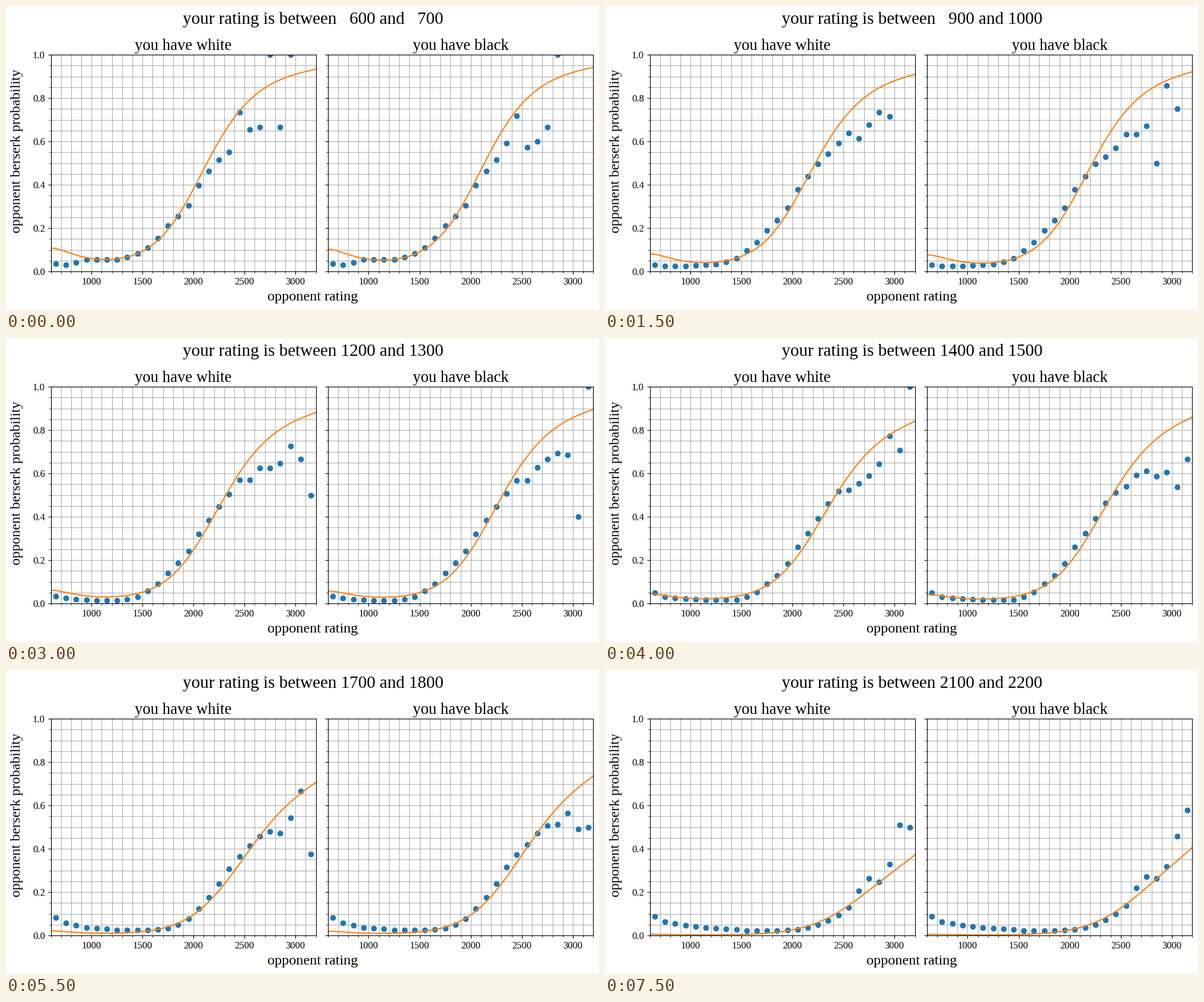
Animation of 1000 by 512 pixels, one loop 8 s. Source, as a matplotlib script:

```python
import numpy as np
import matplotlib.pyplot as plt
from matplotlib.animation import FuncAnimation
from matplotlib.ticker import MultipleLocator

W, H, DPI = 1000, 512, 100
STEPS = 16
NA = np.nan
plt.rcParams["font.family"] = "Liberation Serif"


def logit(p):
    return np.log(p / (1 - p))


def logistic(z):
    return 1 / (1 + np.exp(-z))


# Fitted curve: logit = shape(opponent rating) + shift(own rating)
shape_x = np.array([0.6, 0.85, 1.05, 1.15, 1.25, 1.35, 1.45, 1.55, 1.65, 1.85,
                    2.0, 2.15, 2.25, 2.45, 2.65, 2.85, 3.05, 3.2])
shape_y = [-2.11, -2.51, -2.81, -2.845, -2.8, -2.64, -2.41, -2.11, -1.78, -1.09,
           -0.48, 0.09, 0.39, 1.05, 1.58, 2.04, 2.39, 2.634]
shape = np.polynomial.Polynomial.fit(shape_x, shape_y, 7)

KEYS = [0, 3, 6, 8, 11, 13, 15]
shift = np.polynomial.Polynomial.fit(
    KEYS, [0, -0.322, -0.63, -0.97, -1.755, -2.43, -3.16], 5)

# Observed rates at the key steps: common low part, then a noisy tail per colour
body_x = [650, 750, 950, 1250, 1450, 1550, 1750, 1950, 2050, 2150, 2250]
BODY = np.array([
    [.036, .029, .055, .055, .081, .110, .211, .305, .398, .463, .515],
    [.031, .024, .024, .032, .060, .095, .189, .292, .377, .438, .495],
    [.034, .024, .016, .013, .031, .058, .139, .242, .320, .384, .446],
    [.048, .030, .021, .016, .016, .031, .090, .183, .260, .323, .392],
    [.082, .058, .036, .026, .024, .024, .032, .076, .122, .174, .237],
    [.076, .069, .041, .028, .024, .022, .024, .036, .056, .083, .120],
    [.088, .062, .047, .032, .027, .023, .021, .024, .027, .035, .049],
])
WHITE = np.array([
    [.550, .735, .655, .667, 1, .667, 1, NA, NA],
    [.543, .592, .637, .613, .677, .733, .714, NA, NA],
    [.505, .570, .570, .624, .624, .646, .725, .667, .5],
    [.460, .517, .522, .554, .588, .645, .772, .706, 1],
    [.306, .365, .415, .458, .480, .472, .543, .667, .375],
    [.168, .215, .272, .336, .394, .400, .496, .493, .725],
    [.069, .093, .130, .205, .264, .247, .330, .509, .5],
])
BLACK = np.array([
    [.591, .717, .573, .600, .667, 1, NA, NA, NA],
    [.530, .570, .632, .634, .672, .5, .858, .75, NA],
    [.508, .566, .568, .627, .667, .692, .685, .4, 1],
    [.463, .513, .541, .593, .612, .587, .605, .538, .667],
    [.314, .373, .420, .472, .508, .512, .565, .490, .5],
    [.174, .229, .285, .346, .389, .380, .493, .570, .634],
    [.072, .098, .138, .218, .270, .264, .317, .458, .578],
])

low_x = np.arange(650, 2300, 100)
dot_x = np.arange(650, 3200, 100)
line_x = np.linspace(600, 3200, 400)


def between_keys(table, step):
    i = np.searchsorted(KEYS, step, side="right") - 1
    if KEYS[i] == step:
        return table[i]
    t = (step - KEYS[i]) / (KEYS[i + 1] - KEYS[i])
    return table[i] + t * (table[i + 1] - table[i])


def observed(tail, step):
    anchors = logit(between_keys(BODY, step))
    low = logistic(np.interp(low_x, body_x, anchors))
    return np.concatenate([low, between_keys(tail, step)])


def fitted(black, step):
    z = shape(line_x / 1000) + shift(step)
    if black:
        z = z - 0.06 + 0.21 * ((line_x - 600) / 2600) ** 2.5
    return logistic(z)


fig = plt.figure(figsize=(W / DPI, H / DPI), dpi=DPI, facecolor="white")


def add_panel(left, right, title, y_labels):
    top, bottom = 82, 447
    ax = fig.add_axes([left / W, 1 - bottom / H, (right - left) / W, (bottom - top) / H])
    ax.set(xlim=(600, 3200), ylim=(0, 1))
    ax.xaxis.set_major_locator(MultipleLocator(500))
    ax.xaxis.set_minor_locator(MultipleLocator(100))
    ax.yaxis.set_major_locator(MultipleLocator(0.2))
    ax.yaxis.set_minor_locator(MultipleLocator(0.05))
    ax.grid(True, which="both", color="#b0b0b0", linewidth=0.8)
    ax.tick_params(labelsize=12, labelleft=y_labels)
    ax.set_title(title, fontsize=19.3)
    dots, = ax.plot([], [], "o", color="#1f77b4")
    line, = ax.plot([], [], color="#ff7f0e", linewidth=1.5)
    return dots, line


panels = [
    (*add_panel(75.5, 522.5, "you have white", True), WHITE, False),
    (*add_panel(542.5, 990.5, "you have black", False), BLACK, True),
]


def label(x, y, text, size, **kw):
    return fig.text(x / W, 1 - y / H, text, fontsize=size, ha="center",
                    va="baseline", **kw)


heading = label(517.5, 29.5, "", 21)
label(517.5, 496, "opponent rating", 17.4)
fig.text(24 / W, 1 - 244 / H, "opponent berserk probability", fontsize=17.2,
         rotation=90, rotation_mode="anchor", ha="center", va="baseline")


def padded(n):
    # A space is half as wide as a digit
    return "  " * (4 - len(str(n))) + str(n)


def draw(step):
    rating = 600 + 100 * step
    heading.set_text(f"your rating is between {padded(rating)} and {padded(rating + 100)}")
    for dots, line, tail, black in panels:
        dots.set_data(dot_x, observed(tail, step))
        line.set_data(line_x, fitted(black, step))
    return []


anim = FuncAnimation(fig, draw, frames=STEPS, interval=500, repeat=True,
                     repeat_delay=0, init_func=lambda: draw(0))
plt.show()
```
